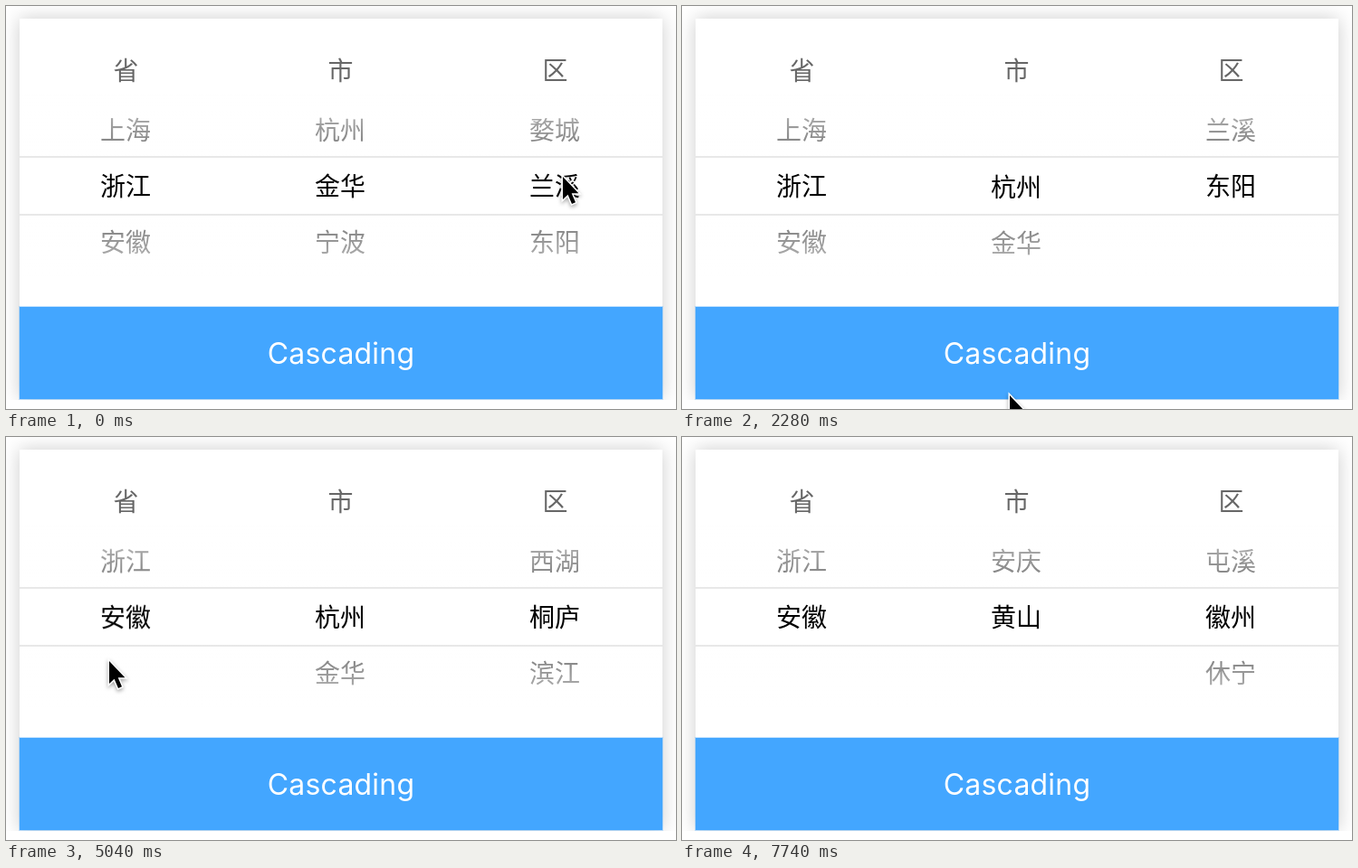
These frames come from a looping animation (740 by 446 pixels, 7.92 s). An HTML page:

```html
<!DOCTYPE html>
<html lang="zh-CN">
<head>
<meta charset="utf-8">
<title>Cascading picker</title>
<style>
  html, body { margin: 0; width: 100%; height: 100%; overflow: hidden; background: #fff; }
  #stage { position: relative; width: 740px; height: 446px; overflow: hidden;
    font: 28px/62px "Noto Sans CJK SC", "Noto Sans CJK", sans-serif; }
  #phone { position: absolute; inset: 0 0 10px; overflow: hidden; }
  #card { position: absolute; left: 15px; top: 14px; width: 710px; height: 421px;
    background: #fff; box-shadow: 0 0 20px rgba(0, 0, 0, .2); }
  .title { position: absolute; top: 25px; color: #666; text-indent: 1px; }
  .title, .wheel { width: 236px; text-align: center; }
  .wheel { position: absolute; top: 82px; height: 206px; overflow: hidden; color: #000; }
  .rows { position: absolute; top: 71px; width: 100%; white-space: pre; will-change: transform; }
  .mask { position: absolute; left: 0; width: 100%; height: 70px; }
  .top { top: 82px; border-bottom: 2px solid #e8e8e8;
    background: linear-gradient(to top, rgba(255,255,255,.45), rgba(255,255,255,.8)) padding-box; }
  .bottom { top: 216px; border-top: 2px solid #e8e8e8;
    background: linear-gradient(rgba(255,255,255,.45), rgba(255,255,255,.8)) padding-box; }
  #button { position: absolute; left: 0; bottom: 0; width: 100%; height: 102px;
    background: #43a6ff; color: #fff; text-align: center;
    box-shadow: 0 0 0 1px rgba(67, 166, 255, .3);
    font: 32px/103px Inter, sans-serif; letter-spacing: .2px; }
  #cursor { position: absolute; left: 0; top: 0; overflow: visible;
    filter: drop-shadow(0 2px 2px rgba(0, 0, 0, .35)); }
</style>
</head>
<body>
<div id="stage">
  <div id="phone">
    <div id="card">
      <div id="wheels"></div>
      <div class="mask top"></div>
      <div class="mask bottom"></div>
      <div id="button">Cascading</div>
    </div>
  </div>
  <svg id="cursor" width="24" height="36">
    <path d="M1 2V27L6.6 21.8L11 32L15 30.3L10.7 20.3H18.4Z"
      fill="#000" stroke="#fff" stroke-width="3" paint-order="stroke"/>
  </svg>
</div>
<script>
  const LOOP = 7920, ROW = 62;
  const glide = u => u < .5 ? 2 * u * u : 1 - 2 * (1 - u) ** 2;
  const settle = u => 1 - (1 - u) ** 5;

  // Moves are [start, end, ease, target values...]; values hold in between.
  function track(from, moves, t) {
    let now = from;
    for (const [start, end, ease, ...to] of moves) {
      if (t < start) break;
      const k = ease(Math.min(1, (t - start) / (end - start || 1)));
      now = now.map((v, i) => v + (to[i] - v) * k);
    }
    return now;
  }

  const pointer = [
    [300, 800, glide, 612, 0],
    [1080, 1400, glide, 361, 201],
    [1500, 1960, glide, 361, 429],
    [2420, 2900, glide, 615, 260],
    [4000, 4654, glide, 113, 246],
    [5190, 5540, glide, 362, 261],
    [5600, 5940, glide, 367, 22],
    [6040, 6560, glide, 608, 258],
    [7260, 7680, glide, 560, 482]
  ];

  // Each list is [time it appears, names]; scroll is in px before edge damping.
  const columns = [
    { title: '省', x: -1, from: ROW,
      lists: [[0, '上海 浙江 安徽']],
      moves: [[4760, 5160, settle, 2 * ROW]] },
    { title: '市', x: 236, from: ROW,
      lists: [[0, '杭州 金华 宁波'], [5160, '合肥 安庆 黄山']],
      moves: [
        [1500, 1960, glide, ROW - 228],
        [2005, 2505, settle, 0],
        [5600, 5940, glide, 239],
        [5945, 6440, settle, 2 * ROW]
      ] },
    { title: '区', x: 473, from: ROW,
      lists: [[0, '婺城 兰溪 东阳'], [2505, '上城 西湖 桐庐 滨江'],
        [5160, '庐阳 包河'], [6440, '屯溪 徽州 休宁']],
      moves: [
        [300, 800, glide, ROW + 187],
        [850, 1350, settle, 2 * ROW],
        [2505, 2505, () => 1, 0],
        [3357, 3757, settle, ROW],
        [3880, 4280, settle, 2 * ROW],
        [5160, 5160, () => 1, 0],
        [7085, 7485, settle, ROW]
      ] }
  ];

  function add(parent, name, text, x) {
    const el = document.createElement('div');
    el.className = name;
    el.textContent = text;
    if (x !== undefined) el.style.left = x + 'px';
    return parent.appendChild(el);
  }

  const wheels = document.getElementById('wheels');
  const cursor = document.getElementById('cursor');
  for (const c of columns) {
    add(wheels, 'title', c.title, c.x);
    c.rows = add(add(wheels, 'wheel', '', c.x), 'rows', '');
  }

  // Past either end the list follows at a third of the speed.
  function damp(y, max) {
    if (y < 0) return y / 3;
    return y > max ? max + (y - max) / 3 : y;
  }

  function draw(t) {
    for (const c of columns) {
      const names = c.lists.filter(l => l[0] <= t).pop()[1].split(' ');
      const text = names.join('\n');
      if (c.rows.textContent !== text) c.rows.textContent = text;
      const y = damp(track([c.from], c.moves, t)[0], (names.length - 1) * ROW);
      c.rows.style.transform = `translateY(${-y}px)`;
    }
    const [x, y] = track([614, 187], pointer, t);
    cursor.style.transform = `translate(${x}px, ${y}px)`;
  }

  const begin = performance.now();
  function frame() {
    draw((performance.now() - begin) % LOOP);
    requestAnimationFrame(frame);
  }
  frame();
</script>
</body>
</html>
```
